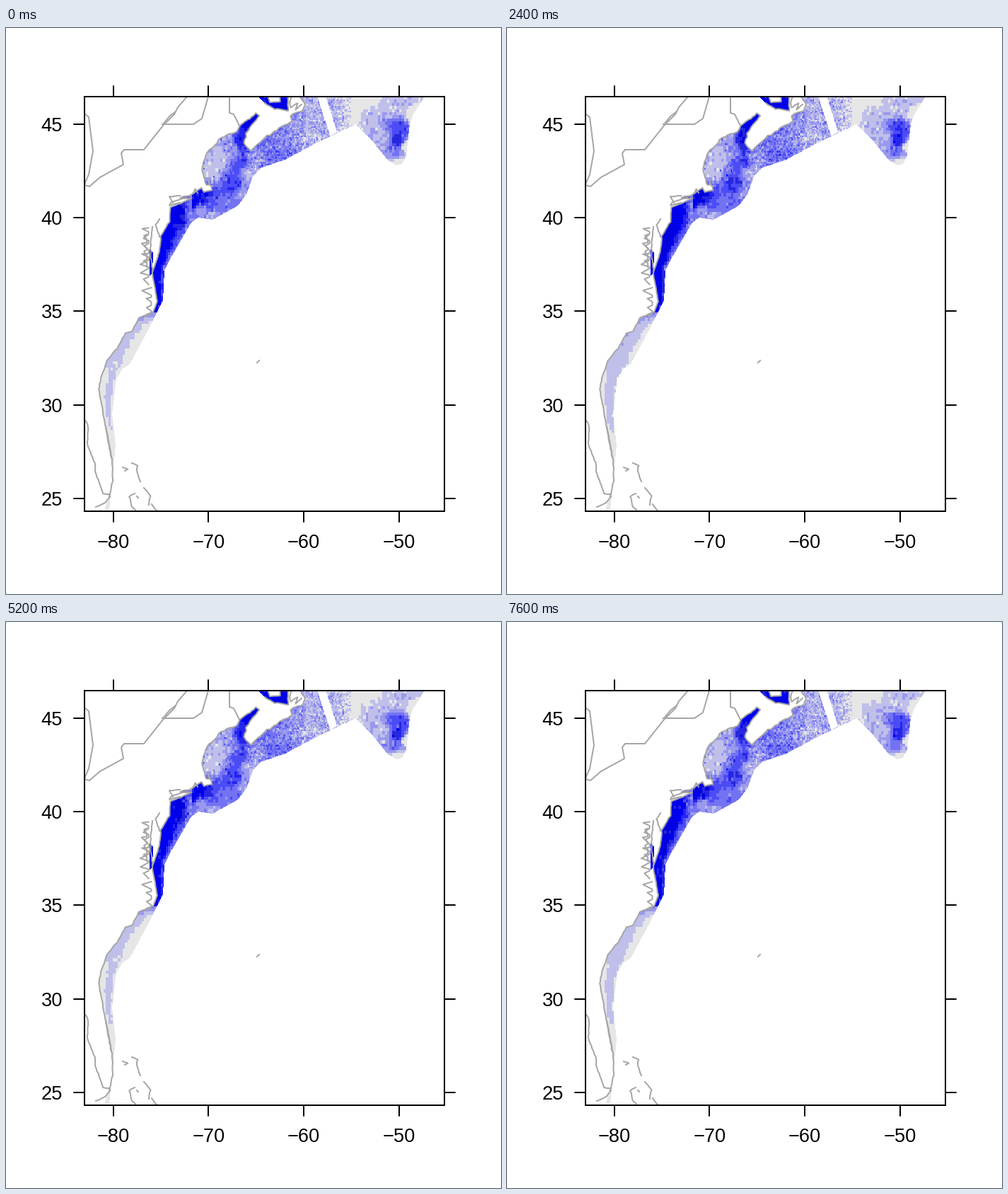
A matplotlib script that plays this animation: 700 by 800 pixels, repeating every 8000 ms.

```python
import numpy as np
import matplotlib.pyplot as plt
from matplotlib.animation import FuncAnimation
from matplotlib.path import Path

FRAMES, INTERVAL = 20, 400
LEFT, RIGHT, TOP, BOTTOM = 111, 620, 97, 683
GREY = "#a6a6a6"
PX = 0.72  # one pixel in points
rng = np.random.default_rng(7)


def roughen(points, amp=0.8, step=4):
    """Resample a line and shake it a little, keeping its ends."""
    pts = np.array(points, float)
    out = [pts[:1]]
    for a, b in zip(pts[:-1], pts[1:]):
        n = max(1, int(np.hypot(*(b - a)) / step))
        t = np.arange(1, n + 1)[:, None] / n
        out.append(a + (b - a) * t + rng.uniform(-amp, amp, (n, 2)))
    out[-1][-1] = pts[-1]
    return np.vstack(out)


def inlets(x, top, bottom, reach):
    """A ragged shore with creeks that run to its left."""
    y = np.arange(top, bottom, 4)
    creek = np.where(np.arange(len(y)) % 3 == 1, rng.uniform(.5, 1, len(y)), .1)
    return np.column_stack([x - reach * creek, y + rng.uniform(-2, 2, len(y))])


# Coast from south to north, in stage pixels
south_coast = roughen([
    (146, 662), (151, 640), (150, 610), (138, 548), (131, 511), (134, 495),
    (143, 470), (157, 453), (169, 431), (178, 429), (188, 410), (208, 401),
    (214, 386), (207, 347)], 0.5)
middle_coast = roughen([
    (207, 345), (216, 320), (219, 295), (231, 274), (232, 254), (262, 241),
    (246, 240), (262, 236), (276, 226), (280, 232), (292, 229), (287, 216),
    (288, 222), (283, 222), (277, 198), (284, 176), (295, 166)], 0.6)
north_coast = roughen([
    (295, 166), (300, 158), (312, 151), (326, 147), (331, 137), (354, 121),
    (358, 124), (340, 148), (337, 163), (346, 174), (366, 155), (404, 131),
    (402, 124), (420, 116), (424, 108), (416, 97)], 1.1)
shelf_edge = [
    (592, 97), (576, 122), (571, 135), (566, 180), (560, 192), (552, 194),
    (540, 187), (515, 156), (494, 136), (440, 162), (395, 186), (362, 197),
    (350, 208), (340, 235), (328, 251), (292, 271), (272, 268), (262, 275),
    (233, 325), (224, 343), (222, 385), (202, 425), (175, 475), (165, 481),
    (156, 496), (150, 545), (155, 590), (146, 681), (139, 681)]
strait = [(357, 97), (370, 97), (373, 105), (388, 104), (388, 97), (399, 97),
          (399, 117), (380, 114), (366, 106)]
bay = [(203, 313), (208, 318), (207, 346), (203, 350)]
data_gap = [(440, 96), (452, 96), (468, 147), (459, 153)]

borders = [
    [(111, 121), (117, 126), (123, 174), (117, 207), (111, 221)],
    [(111, 222), (118, 224), (133, 211), (166, 193), (163, 177), (167, 172),
     (195, 172), (222, 138), (238, 122), (243, 112), (256, 97)],
    [(221, 136), (265, 136), (277, 128), (286, 97)],
    [(222, 136), (231, 125), (240, 118)],
    [(316, 97), (316, 120), (322, 122), (330, 138)],
]
shores = [
    [(111, 554), (116, 561), (115, 590), (126, 615), (126, 627), (137, 658),
     (147, 659)],
    [(127, 677), (141, 671), (147, 662)],
    [(141, 565), (149, 607)],
    [(217, 270), (212, 278), (217, 295)],
    [(207, 345), (204, 312), (207, 281)],
    [(255, 240), (233, 247), (231, 251), (246, 247)],
    [(246, 237), (231, 238), (236, 247)],
    [(262, 236), (268, 228), (271, 233)],
    [(404, 97), (401, 105), (403, 113), (412, 106), (409, 116), (418, 108)],
]
islands = [
    [(165, 621), (172, 623), (168, 626)],
    [(178, 615), (186, 618), (185, 627), (190, 641)],
    [(182, 658), (174, 662), (178, 676), (183, 681)],
    [(185, 662), (187, 664)],
    [(195, 650), (204, 662), (202, 674)],
    [(206, 673), (213, 682)],
    [(355, 473), (358, 470)],
]

# (x, y, level) anchors of the northern field; level 0 is grey, 6 is blue
western = [
    (262, 247, 6), (275, 237, 6), (281, 244, 5), (264, 268, 2.8),
    (277, 257, 2), (290, 250, 3.7), (292, 268, 1.4), (310, 250, 3),
    (323, 220, 4.4), (338, 230, 2), (345, 205, 1.5), (331, 190, 4),
    (332, 160, 5.4), (345, 132, 6), (319, 170, 2.2), (305, 180, 1),
    (290, 202, .9), (310, 153, 1.4), (360, 184, 2.2), (377, 178, 3.2)]
eastern = [
    (395, 163, 2.4), (410, 142, 2.2), (430, 153, 1), (430, 112, 1.4),
    (385, 108, 6), (448, 138, 1.6), (467, 120, 1.1), (492, 118, 0),
    (513, 103, 0), (515, 125, 1), (535, 158, 1.2), (555, 142, 4),
    (553, 159, 5), (553, 175, 2.7), (545, 110, 1), (566, 108, 1.2),
    (577, 120, 0), (568, 168, 0), (556, 191, 0)]

# Pixels that carry data
gx, gy = np.meshgrid(np.arange(LEFT, RIGHT) + .5, np.arange(TOP, BOTTOM) + .5)
pixels = np.column_stack([gx.ravel(), gy.ravel()])


def inside(poly):
    return Path(np.vstack([poly, poly[:1]])).contains_points(pixels)


coast = np.vstack([south_coast, middle_coast, north_coast])
mask = inside(np.vstack([shelf_edge, coast])) | inside(strait) | inside(bay)
mask &= ~inside(data_gap)
px, py = pixels[mask].T


def cells(width, height):
    return (((py - TOP) // height).astype(int),
            ((px - LEFT) // width).astype(int))


row, col = cells(3.37, 4.4)
cx, cy = LEFT + (col + .5) * 3.37, TOP + (row + .5) * 4.4


def x_at(points, y):
    pts = np.array(points)
    pts = pts[np.argsort(pts[:, 1])]
    return np.interp(y, pts[:, 1], pts[:, 0])


def anchored():
    total, weight = np.zeros(len(px)), np.zeros(len(px))
    for x, y, level in western + eastern:
        w = ((cx - x) ** 2 + (cy - y) ** 2 + 12) ** -2.0
        total += w * level
        weight += w
    return total / weight


# Along the narrow shelf the level depends on the way across, 0 to 1
inner = x_at(np.vstack([south_coast, middle_coast[middle_coast[:, 1] > 254]]), cy)
outer = x_at([p for p in shelf_edge if p[1] > 272 and p[0] < 270], cy)
across = np.clip((cx - inner) / np.maximum(outer - inner, 3), 0, 1)
is_south = py > 402
plain = 1.1 - 1.25 * across
ridge = 1.05 - 2.4 * np.abs(across - .62)
ridge *= np.clip((578 - cy) / 20, 0, 1)
mix = np.clip((cy - 465) / 30, 0, 1)
low = np.maximum(plain * (1 - mix) + ridge * mix, 0)
low += np.clip((418 - cy) / 8, 0, 2.2)
high = 6 - 3.6 * np.clip((across - .5) / .5, 0, 1)
high = np.where(cy > 345, 6 - 1.5 * (across > .8), high)
base = np.where(is_south, low, anchored())
base = np.where(~is_south & (cx < 262) & (cy > 225), high, base)

banks = (px > 340) & (px < 488) & (py < 205) & (base < 5)
gulf = (px < 318) & (py < 226) & (py > 150)
coarse = rng.normal(size=(140, 160))[row, col]
fine = rng.normal(size=(280, 310))[cells(1.7, 2.2)]
streak = rng.normal(size=(280, 40))[cells(16, 2.2)]
rough = np.where(is_south, .12, np.where(base > 5.2, .25, .38))
base += coarse * rough * np.clip(base, .15, 1)
base += np.where(banks, .55 * fine + .3 * streak, 0)
base += np.where(gulf & (fine > 1.75), 2.4, 0)
base -= np.where(gulf & (fine < -2), .9, 0)

KEYS = [0, 2, 6, 10, 13, 15, 19]
SOUTH = [0, .18, .3, .02, .04, .18, .16]
NORTH = [0, .1, .04, .09, .01, .07, .01]
weave = np.where((px.astype(int) % 3 == 0) | (py.astype(int) % 4 == 0), .84, 1)
band = np.clip((590 - py) / 30, 0, 1) * (base > .06)


def picture(n):
    jitter = np.random.default_rng(100 + n).normal(size=(140, 160))[row, col]
    value = np.where(is_south, base + np.interp(n, KEYS, SOUTH) * band,
                     base * (1 + np.interp(n, KEYS, NORTH)))
    value += jitter * np.where(is_south, .04 * band, .16 * np.clip(base, 0, 1))
    level = np.clip(np.rint(value), 0, 6)
    red = 230 * (1 - level / 6)
    blue = (230 + 25 * level / 6) * np.where(level >= 5, weave, 1)
    image = np.full((len(pixels), 3), 255, np.uint8)
    image[mask] = np.column_stack([red, red, blue])
    return image.reshape(gx.shape + (3,))


fig = plt.figure(figsize=(7, 8), dpi=100, facecolor="white")
ax = fig.add_axes([0, 0, 1, 1])
field = ax.imshow(picture(0), extent=(LEFT, RIGHT, BOTTOM, TOP),
                  interpolation="nearest", aspect="auto")
ax.set(xlim=(0, 700), ylim=(800, 0))
ax.axis("off")


def line(points, color=GREY, **style):
    x, y = np.transpose(points)
    return ax.plot(x, y, color=color, lw=2 * PX, **style)[0]


frame_box = plt.Rectangle((LEFT, TOP), RIGHT - LEFT, BOTTOM - TOP, fill=False,
                          ec="black", lw=2 * PX, zorder=5)
ax.add_patch(frame_box)
ragged = [roughen(s, .7) for s in shores + islands + [strait]]
ragged += [inlets(203, 281, 362, 14), inlets(200, 290, 340, 9),
           inlets(207, 368, 412, 15)]
for path in [coast] + borders + ragged:
    line(path, solid_joinstyle="round").set_clip_path(frame_box)


def tick(points):
    line(points, "black", solid_capstyle="round", zorder=5)


def label(x, y, text, align):
    ax.text(x, y, text, ha=align, va="baseline", color="black",
            family="Liberation Sans", fontsize=27.3 * PX)


for lon in range(-80, -49, 10):
    x = 151.7 + (lon + 80) * 13.47
    tick([(x, TOP), (x, 82)])
    tick([(x, BOTTOM), (x, 698)])
    label(x, 735, f"\u2212{-lon}", "center")
for lat in range(25, 46, 5):
    y = 664.7 - (lat - 25) * 26.43
    tick([(LEFT, y), (96, y)])
    tick([(RIGHT, y), (635, y)])
    label(80, y + 10, str(lat), "right")


def update(n):
    field.set_data(picture(n))
    return [field]


anim = FuncAnimation(fig, update, frames=FRAMES, interval=INTERVAL,
                     repeat=True, repeat_delay=0)
plt.show()
```
